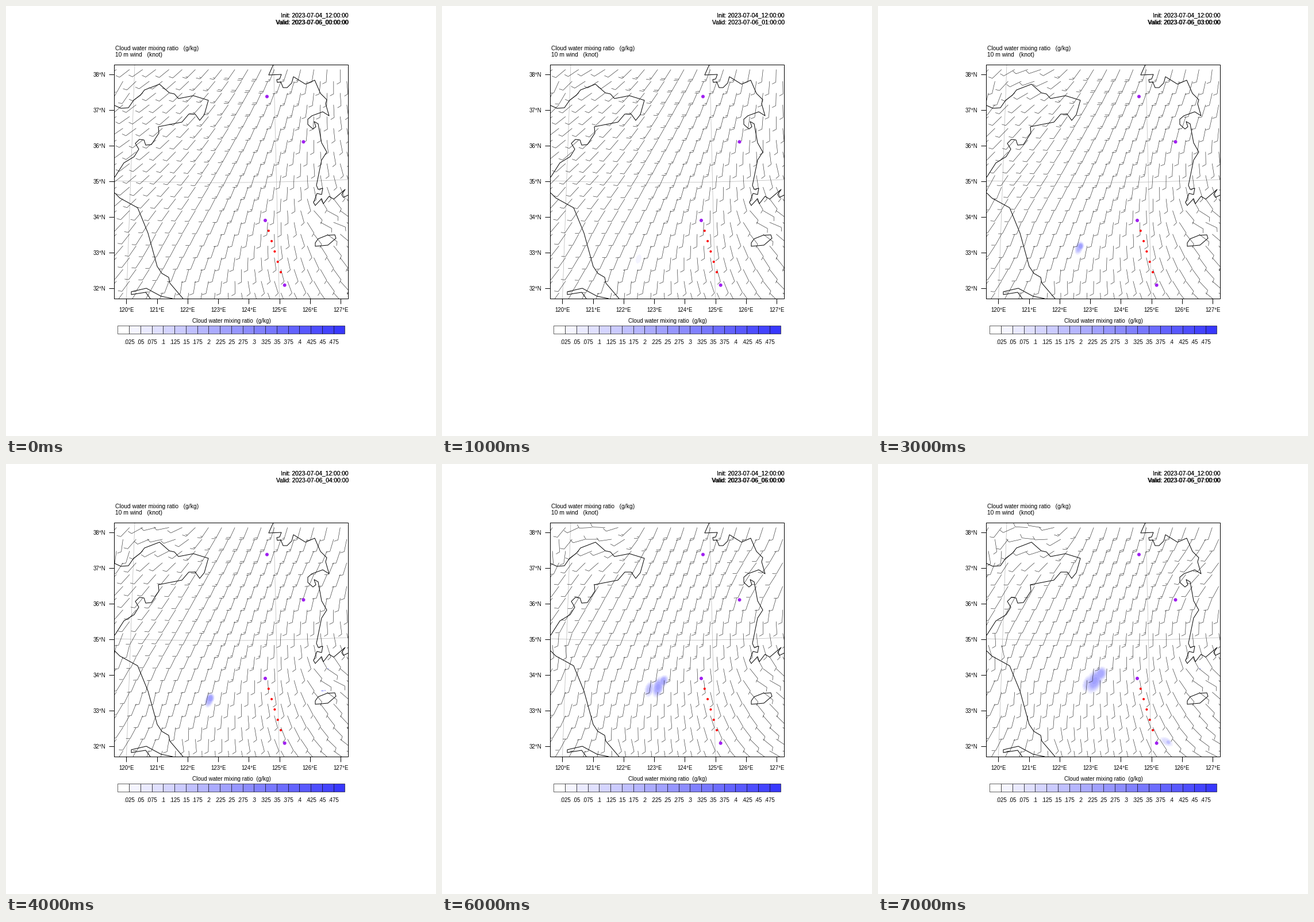
Write a matplotlib script that moves like this. It is 748 by 748 pixels and loops after 8000 ms.

```python
import numpy as np
import matplotlib.pyplot as plt
from matplotlib.animation import FuncAnimation
from matplotlib.collections import LineCollection
from matplotlib.colors import BoundaryNorm, ListedColormap
from matplotlib.patches import Circle, Rectangle

SIZE, DPI = 748, 88
PT = 72 / DPI  # points per pixel
LEFT, RIGHT, TOP, BOTTOM = 188.5, 595.5, 101.5, 509
SPAN = RIGHT - LEFT
STEPS = 8

plt.rcParams["font.family"] = "Liberation Sans"
fig = plt.figure(figsize=(SIZE / DPI, SIZE / DPI), dpi=DPI, facecolor="white")
ax = fig.add_axes([0, 0, 1, 1])
ax.axis("off")


def line(points, width=1.0, color="black", z=3):
    x, y = zip(*points)
    ax.plot(x, y, color=color, lw=width * PT, zorder=z,
            solid_joinstyle="round", solid_capstyle="butt")


def text(x, y, s, size, ha="center"):
    return ax.text(x, y, s, fontsize=size * PT, ha=ha, va="baseline", zorder=6)


def dot(x, y, radius, color):
    ax.add_patch(Circle((x, y), radius, fc=color, ec="none", zorder=5))


# Coastlines
shandong = [
    (189, 173), (200, 178), (213, 177), (222, 164), (234, 155), (241, 146),
    (267, 136), (284, 151), (293, 153), (300, 161), (326, 156), (352, 164),
    (345, 189), (337, 199), (329, 188), (318, 188), (306, 202), (265, 210),
    (266, 221), (253, 241), (243, 242), (240, 233), (232, 232), (225, 239),
    (231, 249), (223, 262), (205, 273), (189, 298)]
jiangsu = [
    (189, 325), (198, 334), (229, 351), (247, 395), (263, 453), (271, 465),
    (283, 472), (285, 482), (308, 509)]
estuary = [
    (290, 509), (270, 505), (244, 491), (218, 497), (218, 502), (243, 498),
    (251, 509)]
korea_north = [
    (465, 102), (457, 120), (479, 119), (476, 127), (471, 128), (472, 133),
    (478, 132), (482, 142), (489, 142), (497, 134), (500, 123), (521, 136),
    (537, 129), (547, 152), (558, 163), (556, 170), (562, 191), (551, 184),
    (532, 191), (525, 197), (525, 206)]
korea_south = [
    (525, 206), (534, 214), (539, 210), (536, 201), (543, 205), (549, 238),
    (558, 254), (549, 268), (540, 312), (543, 319), (551, 317), (549, 328),
    (541, 326), (535, 342), (538, 347), (549, 335), (552, 344), (562, 331),
    (570, 336), (590, 319), (584, 328), (587, 333), (595, 329)]
island = [
    (538, 412), (543, 405), (558, 399), (572, 398), (574, 404), (560, 416),
    (538, 418), (538, 412)]
for coast in (shandong, jiangsu, estuary, korea_north, korea_south, island):
    line(coast)

# Graticule
grey = "#b4b4b4"
line([(224, TOP), (209.5, BOTTOM)], 0.7, grey, 2)
line([(465.5, TOP), (475.5, BOTTOM)], 0.7, grey, 2)
line([(x, 307.2 - 1.03e-4 * (x - 367) ** 2)
      for x in np.linspace(LEFT, RIGHT, 60)], 0.7, grey, 2)

# Frame, ticks and titles
ax.add_patch(Rectangle((LEFT, TOP), SPAN, BOTTOM - TOP, fill=False,
                       ec="black", lw=PT, zorder=5))
for i in range(7):
    y = 119 + 62 * i
    line([(179.5, y), (LEFT, y)])
    text(173, y + 3.6, f"{38 - i}°N", 9.6, "right")
for i in range(8):
    x = 209.5 + 53.25 * i
    line([(x, BOTTOM), (x, 518)])
    text(x, 532.5, f"{120 + i}°E", 9.6)

text(190, 76.5, "Cloud water mixing ratio   (g/kg)", 10.3, "left")
text(190, 88, "10 m wind   (knot)", 10.3, "left")
valid = []
for x in (595.7, 596.05):  # doubled for a heavier look
    text(x, 19, "Init: 2023-07-04_12:00:00", 10.3, "right")
    valid.append(text(x, 31.3, "", 10.3, "right"))

# Colour bar
shades = [(1 - 0.78 * i / 19, 1 - 0.78 * i / 19, 1) for i in range(20)]
CELL = 19.75
for i, shade in enumerate(shades):
    x = 194.5 + CELL * i
    ax.add_patch(Rectangle((x, 555.5), CELL, 14.5, fc=shade,
                           ec="black", lw=0.6 * PT))
    if i:
        text(x, 588.5, f"{0.025 * i:.3f}".strip("0"), 9.8)
text(392, 551, "Cloud water mixing ratio  (g/kg)", 9.85)

# Stations and track
for x, y in [(454, 157.5), (517.5, 236.3), (451, 373), (484.7, 485.6)]:
    dot(x, y, 3, "#a020f0")
for i in range(5):
    dot(456.8 + 5.3 * i, 391 + 18 * i, 2, "red")

# Wind barbs stand on a staggered grid
DX, DY, STAFF = 22.9, 20.45, 22
heads = np.array([(192 + DX * (c + r % 2 / 2), 110.5 + DY * r)
                  for r in range(20) for c in range(18)])
heads = heads[heads[:, 0] < RIGHT]
U, V = (heads[:, 0] - LEFT) / SPAN, (heads[:, 1] - TOP) / SPAN

# Local turns of the wind: u, v, radius, degrees at start and end
turns = [
    (0.22, 0.04, 0.12, 0, 75), (0.03, 0.1, 0.06, -35, -60),
    (0.03, 0.52, 0.07, 0, -55), (0.93, 0.2, 0.18, 0, 42),
    (0.91, 0.66, 0.09, -50, -35), (0.15, 0.72, 0.12, -10, -22),
    (0.3, 0.93, 0.07, -14, -26), (0.6, 0.97, 0.13, -10, 14)]


def bump(u, v, ru, rv):
    return np.exp(-((U - u) / ru) ** 2 - ((V - v) / rv) ** 2)


KNOTS = 8 + 4 * bump(0.5, 0.5, 0.3, 1) + 8 * bump(0.6, 0, 0.25, 0.4)


def staff_angles(part):
    """Angle of each staff from south, positive toward west."""
    start = 58 - 62 * U ** 1.5 - 25 * U * V - 22 * V ** 2
    end = 34 - 32 * U - 75 * U * V ** 2
    for u, v, r, a, b in turns:
        shape = bump(u, v, r, r)
        start = start + a * shape
        end = end + b * shape
    return np.radians(start + (end - start) * part)


def toward(angle):
    return np.array([-np.sin(angle), np.cos(angle)])


def barb(head, angle, knots):
    out = toward(angle)
    side = toward(angle + np.radians(62))
    tail = head + STAFF * out
    segments = [(head, tail)]
    halves = max(1, round(knots / 5))
    lengths = [7.2] * (halves // 2) + [3.6] * (halves % 2)
    for i, length in enumerate(lengths):
        root = tail - out * 3 * (i + (halves == 1))
        segments.append((root, root + side * length))
    return segments


def wind(step):
    angles = staff_angles(step / (STEPS - 1))
    return [s for h, a, k in zip(heads, angles, KNOTS) for s in barb(h, a, k)]


barbs = LineCollection([], colors="#202020", linewidths=0.6 * PT, zorder=4)
ax.add_collection(barbs)
barbs.set_clip_path(Rectangle((LEFT, TOP), SPAN, BOTTOM - TOP,
                              transform=ax.transData))

# Cloud cells
gx, gy = np.meshgrid(np.arange(189, 595) + 0.5, np.arange(102, 509) + 0.5)


def cell(x, y, rx, ry, lean, peak):
    c, s = np.cos(np.radians(lean)), np.sin(np.radians(lean))
    u = ((gx - x) * c + (gy - y) * s) / rx
    v = ((gy - y) * c - (gx - x) * s) / ry
    return peak * np.exp(-0.9 * (u * u + v * v) ** 1.8)


def cells(step):
    s, late = step - 1, step - 5
    if s >= 0:  # western cell drifts north-east
        peak = np.interp(step, [1, 2, 4, 5, 7], [0.045, 0.17, 0.2, 0.17, 0.15])
        yield 342 + 3.8 * s, 440 - 9.7 * s, 5 + 0.4 * s, 9 + 0.6 * s, 18, peak
    if 2 <= step <= 4:  # its denser head
        yield 343 + 3 * step, 448 - 10 * step, 2 + step, 2 + 1.5 * step, 18, 0.25
    if late >= 0:  # eastern pair grows and merges
        yield 375 + late, 399 - 11 * late, 5.5 + 2.7 * late, 11 + 4 * late, 5 + 10 * late, 0.23
        yield 382 + 2.5 * late, 391 - 13 * late, 4.5 + 2.2 * late, 8 + 1.5 * late, 32, 0.22
    if step in (4, 5):  # specks off the island
        yield 550.5, 394.5, 2.5, 1, 0, 0.25
        yield 555 + 7 * late + 7, 394 - 2.5 * (late + 1), 1.5, 1, 0, 0.2
    if step in (4, 7):
        yield 560, 356, 1, 1, 0, 0.25
    if step == 7:
        yield 502, 483, 11, 6, 30, 0.1
        yield 505, 484, 5, 4, 30, 0.16


def cloud_field(step):
    field = np.zeros(gx.shape)
    for args in cells(step):
        field = np.maximum(field, cell(*args))
    return field


cloud = ax.imshow(cloud_field(0), extent=(189, 595, 509, 102), zorder=1,
                  cmap=ListedColormap(shades), interpolation="nearest",
                  norm=BoundaryNorm(np.arange(21) * 0.025, 20))
ax.set_aspect("auto")
ax.set_xlim(0, SIZE)
ax.set_ylim(SIZE, 0)


def draw(step):
    for label in valid:
        label.set_text(f"Valid: 2023-07-06_{step:02d}:00:00")
    barbs.set_segments(wind(step))
    cloud.set_data(cloud_field(step))
    return [*valid, barbs, cloud]


anim = FuncAnimation(fig, draw, frames=STEPS, interval=1000, repeat=True,
                     repeat_delay=0)
plt.show()
```
